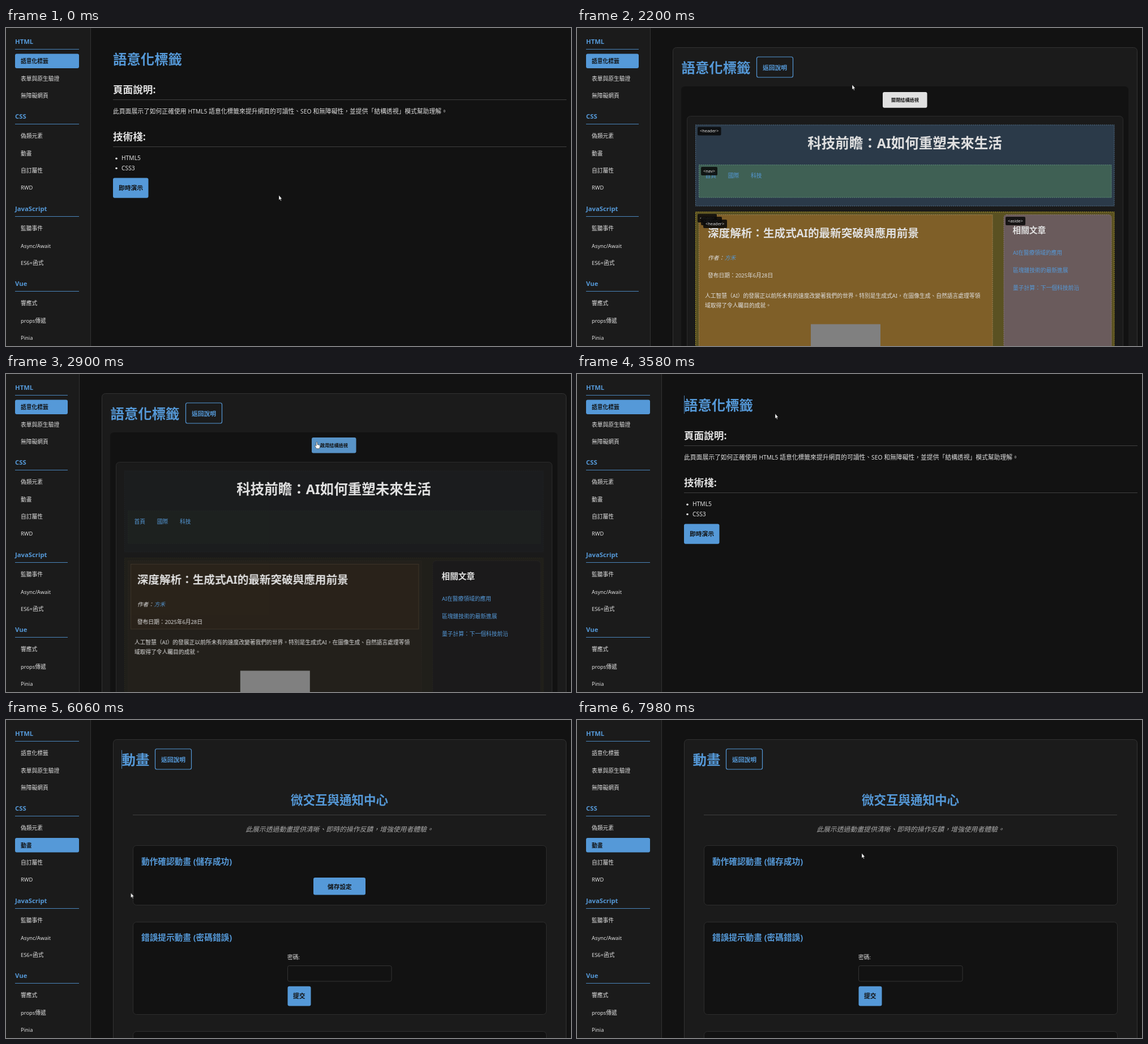
An HTML page that plays this animation: 998 px wide and 561 px high, repeating every 8000 ms.

```html
<!DOCTYPE html>
<html lang="zh-TW">
<head>
<meta charset="utf-8">
<title>語意化標籤</title>
<style>
html,body{margin:0;height:100%;overflow:hidden;background:#121212}
svg{display:block;width:100vw;height:100vh;font-family:"Noto Sans","Noto Sans CJK TC","Noto Sans CJK",sans-serif}
text{fill:#e0e0e0;white-space:pre}
tspan{font-size:.953em}
.b{font-weight:700}
.a{fill:#5599d8}
.d{fill:#121212}
.i{font-style:italic}
.m{text-anchor:middle}
.soft{fill:#aaa}
.card{fill:#1b1b1b;stroke:#333}
.box{fill:#121212;stroke:#2e2e2e}
.btn{fill:#5599d8}
.ghost{fill:none;stroke:#5599d8;stroke-width:1.2}
.rule{stroke:#404040}
.caret{stroke:#4a7fb2}
.dash{stroke-dasharray:2 1.5}
.hov{fill:#4778a8}
#save{transform-origin:589px 293.2px}
</style>
</head>
<body>
<svg id="stage" viewBox="0 0 998 561"></svg>
<script>
const LOOP = 8000;
const pct = ms => ms / LOOP * 100 + '%';

// Text is placed by its left (or middle) edge and its vertical centre.
const raw = (x, cy, size, str, cls = '') =>
  `<text x="${x}" y="${cy + size * .37}" font-size="${size}" class="${cls}">${str}</text>`;
const text = (x, cy, size, str, cls) =>
  raw(x, cy, size, str.replace(/[A-Za-z0-9+\/]+/g, '<tspan>$&</tspan>'), cls);
const rect = (x, y, x2, y2, r, attr) =>
  `<rect x="${x}" y="${y}" width="${x2 - x}" height="${y2 - y}" rx="${r}" ${attr}/>`;
const hline = (x, x2, y, attr = 'class="rule"') =>
  `<path d="M${x} ${y}H${x2}" ${attr}/>`;
const caret = (id, x, y, y2) => `<path id="${id}" class="caret" d="M${x} ${y}V${y2}"/>`;
const group = (id, ...parts) => `<g id="${id}">${parts.join('')}</g>`;

const menu = [
  ['HTML', 24, ['語意化標籤', '表單與原生驗證', '無障礙網頁']],
  ['CSS', 156, ['偽類元素', '動畫', '自訂屬性', 'RWD']],
  ['JavaScript', 319, ['監聽事件', 'Async/Await', 'ES6+函式']],
  ['Vue', 451, ['響應式', 'props傳遞', 'Pinia']]
];

function sidebar(w, active) {
  let out = rect(0, 0, w, 561, 0, 'fill="#1b1b1b"') +
    `<path d="M${w + .5} 0V561" stroke="#333"/>`;
  for (const [name, y, items] of menu) {
    out += raw(16, y, 11.3, name, 'a b') +
      hline(16, w - 20, y + 13.5, 'stroke="#4a86bd"');
    items.forEach((item, k) => {
      const cy = y + 34.5 + k * 30.4, on = item === active;
      if (on) out += rect(16, cy - 13, w - 20, cy + 12.6, 3, 'class="btn"');
      out += text(26, cy, 9.78, item, on ? 'b d' : '');
    });
  }
  return out;
}

const hoverItem = (id, cls) =>
  group(id, rect(16, 208, 129.5, 234, 3, 'class="hov"'), text(26, 221, 9.78, '動畫', cls));

function intro(title, about, stack) {
  let out = text(189, 55, 24.4, title, 'a b') +
    text(189, 108, 17.6, '頁面說明:', 'b') + hline(189, 990, 126.5) +
    text(189, 147, 10.8, about) +
    text(189, 191, 17.6, '技術棧:', 'b') + hline(189, 990, 209.5);
  stack.forEach((name, k) => {
    const y = 229.5 + k * 17.2;
    out += `<circle cx="195" cy="${y + .8}" r="1.8" fill="#e0e0e0"/>` + text(204, y, 10.8, name);
  });
  return out;
}

const demoButton = (dy, id) =>
  rect(189, 264.5 + dy, 251.5, 299.7 + dy, 3, 'class="btn"') +
  rect(189, 264.5 + dy, 251.5, 299.7 + dy, 3, `id="${id}" fill="#4d88c0"`) +
  text(199, 282.5 + dy, 10.75, '即時演示', 'b d');

const demoHead = (x, title, bx) =>
  rect(x, 34.5, 989.5, 600, 6, 'class="card"') +
  text(x + 15, 70, 24.4, title, 'a b') +
  rect(bx, 51, bx + 64, 87, 3, 'class="ghost"') +
  text(bx + 10.5, 70, 10.75, '返回說明', 'a b');

const tag = (x, y, w, name) =>
  rect(x, y, x + w, y + 15, 2, 'fill="#0b0b0b" fill-opacity=".88"') +
  raw(x + 4, y + 7.2, 7.4, `&lt;${name}&gt;`);

const zone = (x, y, x2, y2, fill, stroke, r = 0) =>
  rect(x, y, x2, y2, r, `class="dash" fill="${fill}" stroke="${stroke}"`);

const semanticDemo = () =>
  demoHead(169.5, '語意化標籤', 317.5) +
  rect(184, 103, 974, 600, 6, 'fill="#121212"') +
  rect(194.5, 155.5, 964.5, 600, 6, 'fill="#1a1a1a" stroke="#2c2c2c"') +
  rect(754, 330, 944, 600, 6, 'fill="#131315"') +
  group('zones',
    zone(209.5, 171, 949, 314, '#2b3a49', '#55728d'),
    zone(215.5, 241.5, 944, 299, '#3f6054', '#5f8c79'),
    zone(209.5, 324.5, 949, 600, '#5a5122', '#b3a02a'),
    zone(215.5, 329.5, 734, 600, '#7f5f28', '#a58a5c'),
    zone(754, 329.5, 944, 600, '#6a5b5c', '#8d7b7e', 5)) +
  group('inner', rect(220.5, 335.5, 729, 450, 0,
    'fill="#4a2c18" fill-opacity=".18" stroke="#3d3429"')) +
  text(579, 203, 24.5, '科技前瞻：AI如何重塑未來生活', 'b m') +
  ['首頁', '國際', '科技'].map((s, k) => text(226.5 + k * 40.3, 260.5, 9.75, s, 'a')).join('') +
  text(769.5, 357, 14.65, '相關文章', 'b') +
  ['AI在醫療領域的應用', '區塊鏈技術的最新進展', '量子計算：下一個科技前沿']
    .map((s, k) => text(770, 396 + k * 31.3, 9.75, s, 'a')).join('') +
  group('story',
    text(231, 361.8, 19.6, '深度解析：生成式AI的最新突破與應用前景', 'b'),
    text(231, 405.5, 9.75, '作者：', 'i'),
    text(260.7, 405.5, 9.75, '方禾', 'i a'),
    text(231, 436, 9.75, '發布日期：2025年6月28日'),
    text(226, 472.3, 9.75, '人工智慧（AI）的發展正以前所未有的速度改變著我們的世界。特別是生成式AI，在圖像生成、自然語言處理等領'),
    text(226, 489, 9.75, '域取得了令人矚目的成就。'),
    rect(413, 522.5, 536, 600, 0, 'fill="#808080"')) +
  group('tags',
    tag(213, 174.5, 41.5, 'header'), tag(219, 245, 29, 'nav'),
    tag(213, 328, 34, 'main'), tag(219, 333, 37, 'article'),
    tag(223, 338, 42, 'header'), tag(757, 333, 35, 'aside')) +
  group('closeBtn', rect(540, 113, 618.5, 140.7, 3, 'fill="#e0e0e0"'),
    text(555, 127.3, 8.15, '關閉結構透視', 'b d')) +
  group('openBtn', rect(540, 112, 618.5, 139.5, 3, 'fill="#5893c7"'),
    text(555, 126.2, 8.15, '啟用結構透視', 'b d'));

const motionDemo = () =>
  demoHead(189.5, '動畫', 263.5) +
  text(589, 141, 21.5, '微交互與通知中心', 'a b m') +
  hline(224, 954, 167.5) +
  text(589, 192.5, 11.85, '此展示透過動畫提供清晰、即時的操作反饋，增強使用者體驗。', 'i m soft') +
  rect(224.5, 221.5, 954.5, 326.5, 6, 'class="box"') +
  text(239, 249.5, 14.65, '動作確認動畫 (儲存成功)', 'a b') +
  rect(543, 278, 635, 308.5, 3, 'id="save" class="btn"') +
  group('saveText', text(568, 294, 10.7, '儲存設定', 'b d')) +
  rect(224.5, 356.5, 954.5, 519.5, 6, 'class="box"') +
  text(239, 384, 14.65, '錯誤提示動畫 (密碼錯誤)', 'a b') +
  text(497, 418, 9.75, '密碼:') +
  rect(497.5, 433.5, 681, 461, 3, 'fill="#121212" stroke="#333"') +
  rect(497.5, 469.7, 538.5, 504.5, 3, 'class="btn"') +
  text(507, 487.5, 10.8, '提交', 'b d') +
  rect(224.5, 549.5, 954.5, 700, 6, 'class="box"');

const pointer = `<g id="pointer">
  <circle id="dot" r="6.3" fill="#c4c416" fill-opacity=".78"/>
  <path id="arrow" d="M0 0V8.6L1.9 6.9 3.2 10 4.4 9.5 3.2 6.5H5.6Z" fill="#fff" stroke="#111" stroke-width=".5"/>
  <path id="hand" d="M-1 .8a1 1 0 0 1 2 0V4.5l3.5.8q1.3.4 1.2 1.8l-.6 3q-.3 1.6-1.5 1.6H.4q-1 0-1.7-1.2l-2.3-3.7q-.3-.9.6-1 .8 0 2 1.3z" fill="#fff" stroke="#222" stroke-width=".6"/>
</g>`;

document.getElementById('stage').innerHTML =
  group('tagIntro', sidebar(149, '語意化標籤'), hoverItem('hover1', 'd'),
    intro('語意化標籤', '此頁面展示了如何正確使用 HTML5 語意化標籤來提升網頁的可讀性、SEO 和無障礙性，並提供「結構透視」模式幫助理解。', ['HTML5', 'CSS3']),
    demoButton(0, 'press1'), caret('caret1', 189.5, 38, 70)) +
  group('tagDemo', sidebar(129, '語意化標籤'), semanticDemo(), caret('caret2', 184.5, 53, 86)) +
  group('animIntro', sidebar(149, '動畫'), hoverItem('hover2', 'b d'),
    intro('動畫', '此頁面展示了如何使用 CSS 動畫提供清晰、即時的操作反饋，增強使用者體驗。', ['HTML5', 'CSS3', 'JavaScript']),
    demoButton(17.2, 'press2'), caret('caret3', 189.5, 38, 70)) +
  group('animDemo', sidebar(149, '動畫'), motionDemo(), caret('caret4', 204.5, 53, 86)) +
  pointer;

// Timeline: all times in milliseconds of the loop.
let css = '';
function play(id, frames, ease) {
  css += `@keyframes ${id}{` + frames.map(([ms, rule]) => `${pct(ms)}{${rule}}`).join('') +
    `}#${id}{animation:${id} ${LOOP}ms ${ease} infinite}`;
}
function show(id, ...spans) {
  const frames = [[0, 'opacity:0']];
  for (const [from, to] of spans) frames.push([from, 'opacity:1'], [to, 'opacity:0']);
  play(id, frames, 'step-end');
}
function hide(id, ...spans) {
  const frames = [[0, 'opacity:1']];
  for (const [from, to] of spans) frames.push([from, 'opacity:0'], [to, 'opacity:1']);
  play(id, frames, 'step-end');
}

show('tagIntro', [0, 1260], [3450, 4850]);
show('tagDemo', [1260, 3450]);
show('animIntro', [4850, 6060]);
show('animDemo', [6060, LOOP]);

show('caret1', [3450, 3980], [4510, 4850]);
show('caret2', [1260, 1790], [2320, 2850]);
show('caret3', [4850, 5410]);
show('caret4', [6060, 6590], [7120, 7650]);

show('press1', [800, 1260]);
show('press2', [5790, 6060]);
show('hover1', [4470, 4850]);
show('hover2', [4850, 5480]);

const hands = [[800, 1260], [2340, 3010], [3190, 3450], [4470, 5480], [5790, 6050], [6650, 6820]];
show('hand', ...hands);
hide('arrow', ...hands);
show('dot', [1130, 1260], [2480, 2550], [3380, 3450], [4800, 4860], [6020, 6060], [6780, 6860]);

show('closeBtn', [0, 2480]);
show('tags', [0, 2480]);
show('openBtn', [2480, LOOP]);
play('story', [[0, 'transform:none'], [2480, 'transform:translate(.8px,.9px)'],
  [LOOP, 'transform:none']], 'step-end');
play('zones', [[0, 'opacity:1'], [2480, 'opacity:1'], [2690, 'opacity:.5'], [2900, 'opacity:.1'],
  [3050, 'opacity:0'], [LOOP, 'opacity:0']], 'linear');
play('inner', [[0, 'opacity:0'], [2479, 'opacity:0'], [2480, 'opacity:1'], [2900, 'opacity:1'],
  [3050, 'opacity:0'], [LOOP, 'opacity:0']], 'linear');

const full = 'x:543px;width:92px;rx:3px;transform:scale(1)';
const round = s => `x:573.8px;width:30.5px;rx:15.2px;transform:scale(${s})`;
play('save', [[0, full], [6800, full], [7090, round(1)], [7780, round(1)],
  [7980, round(0)], [LOOP, round(0)]], 'linear');
show('saveText', [0, 6820]);

const at = (x, y) => `transform:translate(${x}px,${y}px)`;
play('pointer', [
  [0, at(482, 295)], [390, at(482, 295)],
  [930, at(221, 284)], [1730, at(221, 284)],
  [2200, at(486, 100)], [2400, at(549, 120)], [2960, at(549, 120)],
  [3280, at(350, 70)], [3840, at(350, 70)],
  [4560, at(87.5, 233.5)], [5400, at(87.5, 233.5)],
  [5870, at(220.5, 305)], [6340, at(220.5, 305)],
  [6740, at(590, 293)], [7300, at(590, 293)],
  [7910, at(503, 235)], [LOOP, at(503, 235)]
], 'ease-in-out');

const sheet = document.createElement('style');
sheet.textContent = css;
document.head.append(sheet);
</script>
</body>
</html>
```
